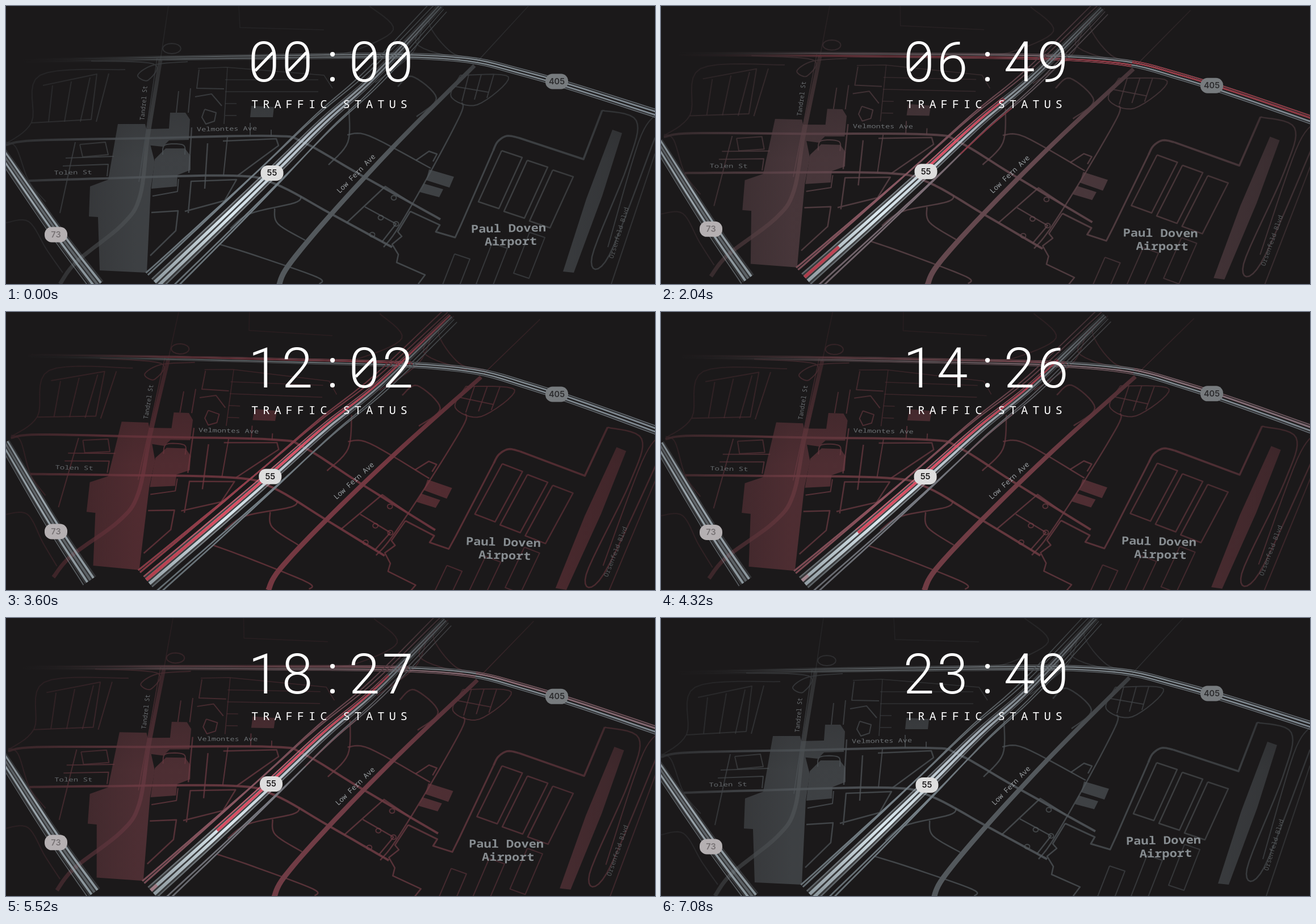
Animation, 1143 px wide and 490 px high, one loop 7200 ms. Source, as an HTML page with a canvas:

```html
<!DOCTYPE html>
<html lang="en">
<head>
<meta charset="utf-8">
<title>Traffic status</title>
<style>
  html, body { margin: 0; width: 100%; height: 100%; overflow: hidden; background: #1b191a; }
  canvas, svg { position: absolute; left: 0; top: 0; width: 1143px; height: 490px; display: block; }
  #clock text { font: 300 98.5px Roboto, "Open Sans", sans-serif; text-anchor: middle; fill: #fff; }
  #clock line { stroke: #fff; stroke-width: 5; }
  #title { font: 400 20.5px "Noto Sans Mono", "DejaVu Sans Mono", monospace; letter-spacing: 7.9px; fill: #fff; }
</style>
</head>
<body>
<canvas id="map" width="1143" height="490"></canvas>
<svg viewBox="0 0 1143 490">
  <g id="clock"></g>
  <text id="title" x="432" y="179.5">TRAFFIC STATUS</text>
</svg>
<script>
const W = 1143, H = 490, LOOP = 7200, STEP = 120;
const ctx = document.getElementById('map').getContext('2d');
let turn = 0;

const lerp = (a, b, k) => a + (b - a) * k;
const mix = (a, b, k) => `rgb(${a.map((v, i) => Math.round(lerp(v, b[i], k))).join()})`;
const ease = (a, b, x) => {
  const k = Math.min(1, Math.max(0, (x - a) / (b - a)));
  return k * k * (3 - 2 * k);
};
// Rises from a to b, stays up, falls from c to d.
const span = (x, a, b, c, d) => ease(a, b, x) * (1 - ease(c, d, x));

// Turn a point about the stage centre on the tilted ground plane.
const CX = 571.5, CY = 245, TILT = 0.745, DEPTH = 4.4e-4;
function warp([x, y]) {
  const X = x - CX, Y = CY - y;
  const v = Y / (TILT - DEPTH * Y), u = X * (1 + DEPTH * v);
  const c = Math.cos(turn), s = Math.sin(turn);
  const u2 = u * c + v * s, v2 = v * c - u * s, z = 1 + DEPTH * v2;
  return [CX + u2 / z, CY - TILT * v2 / z];
}

function parse(text) {
  return text.split(' ').map(p => p.split(',').map(Number));
}

// Catmull-Rom curve through the points.
function smooth(p) {
  const out = [];
  for (let i = 0; i < p.length - 1; i++) {
    const a = p[i - 1] || p[i], b = p[i], c = p[i + 1], d = p[i + 2] || c;
    for (let t = 0; t < 1; t += 0.125) {
      out.push([0, 1].map(j => b[j] + 0.5 * t * (c[j] - a[j] +
        t * (2 * a[j] - 5 * b[j] + 4 * c[j] - d[j] + t * (3 * (b[j] - c[j]) + d[j] - a[j])))));
    }
  }
  return [...out, p[p.length - 1]];
}

function trace(pts, close) {
  ctx.beginPath();
  pts.forEach(p => ctx.lineTo(...warp(p)));
  if (close) ctx.closePath();
}

const areas = [], streets = [];
const area = text => areas.push(parse(text));
const street = (w, a, pts) => streets.push({ w, a, pts });
const line = (w, text, a = 0.85) => street(w, a, parse(text));
const curve = (w, text, a = 0.85) => street(w, a, smooth(parse(text)));
function ring(x, y, rx, ry, w = 2) {
  street(w, 0.8, Array.from({ length: 17 }, (_, i) =>
    [x + rx * Math.cos(i * Math.PI / 8), y + ry * Math.sin(i * Math.PI / 8)]));
}
// Slanted box from a corner and two side vectors.
function box(x, y, ax, ay, bx, by, w = 2.5, a = 0.75) {
  street(w, a, [[x, y], [x + ax, y + ay], [x + ax + bx, y + ay + by], [x + bx, y + by], [x, y]]);
}

// Built-up areas and runway
area('197,208 245,208 262,275 255,322 248,470 165,466 162,372 146,371 148,318 180,306');
area('245,217 287,216 289,188 316,188 324,200 322,236 287,237 276,248 248,245');
area('262,270 281,251 315,251 325,264 325,289 302,298 301,318 256,322');
area('432,176 472,178 470,196 430,196');
area('745,288 789,301 781,320 740,307');
area('736,313 770,323 763,337 729,328');
area('1068,218 1085,224 1050,335 1000,470 981,468 1022,340');

// Main streets
curve(4, '0,245 50,237 250,233 470,229 525,241 625,298 765,376', 1);
curve(4, '40,308 170,304 400,299 475,314 572,366 680,425', 1);
curve(7, '272,95 250,230 236,335 205,385 125,450 95,490', 0.75);
line(1.5, '286,0 272,95', 0.6);
line(1.5, '266,92 234,310');

// West side
curve(2, '0,243 45,205 60,122 210,112', 0.6);
curve(2, '0,240 18,250 40,308 70,345', 0.6);
curve(2, '0,382 40,380 72,430 100,470', 0.5);
line(2, '45,206 150,200 160,120 65,140', 0.7);
for (let i = 0; i < 4; i++) line(2, `${82 + i * 33},${140 - i * 7} ${75 + i * 28},204`, 0.7);
box(130, 244, 45, -4, 5, 22, 2);
line(2, '105,268 190,265');
line(2, '100,282 180,279 178,300');
line(2, '122,240 95,365');

// Around the mall
line(2, '325,145 321,188');
line(2, '304,150 300,188');
curve(2, '276,262 280,245 312,245 315,262');
for (const x of [352, 324]) line(2.5, `${x + 3},${x - 110} ${x - 2},${x - 30}`);
line(2.5, '382,238 476,234 480,246 408,299');
line(2, '390,231 383,299');
line(2, '430,206 430,229');
line(2, '467,218 467,230');
line(2.5, '315,362 385,343 406,306 326,309 321,365');
line(2.5, '256,364 303,361 299,396 254,440');
line(2, '258,335 302,327 304,305');

// North blocks
line(1.5, '338,110 388,108 560,122 575,145', 0.7);
line(1.5, '390,108 384,208', 0.7);
for (let y = 130; y < 200; y += 21) line(1.5, `386,${y} ${y < 160 ? 550 : 406},${y}`, 0.6);
line(2, '340,112 336,145 384,146');
line(2, '333,160 362,155 380,176');
line(2, '350,182 370,188 367,203 352,208 345,196 350,182');
ring(292, 75, 16, 9);
curve(2, '150,97 260,102 250,131 232,122 260,104 320,98');
line(1.5, '410,0 412,38 560,42', 0.5);
curve(2, '640,0 682,42 610,80 560,86', 0.7);
curve(2, '770,0 745,30 785,82 830,92');
curve(2, '755,8 722,65 800,94');
curve(2, '735,28 715,84 650,135');
line(1.5, '920,0 830,98');

// East of the freeway
curve(2.5, '690,142 715,124 758,162 723,195');
curve(2.5, '604,180 602,240 568,280');
curve(2.5, '601,227 640,229 748,286');
line(2.5, '722,272 745,256 759,261 752,274');
curve(2.5, '803,170 800,192 745,297 690,392 665,425');
curve(2, '800,122 885,125 830,174 784,160 800,122');
for (let i = 0; i < 3; i++) line(2, `${815 + i * 22},121 ${803 + i * 22},${168 - i * 3}`);
line(2, '792,142 850,152');
line(2.5, '600,382 668,318 712,346');
line(2.5, '632,354 687,384 662,416');
for (const p of ['683,338', '660,373', '687,384', '645,403']) ring(...p.split(',').map(Number), 4.5, 4);
curve(2.5, '473,357 479,384 527,413');
curve(2.5, '395,392 430,366 508,347 520,335');
curve(2.5, '376,420 440,440 548,478 552,490');

// Airport grounds
line(3, '712,362 764,386 757,398 791,408 802,384 858,255');
curve(3.5, '858,255 866,239 882,229 902,232');
line(3.5, '902,232 1017,270 1050,184');
line(2.5, '712,362 690,398 697,406 680,420 691,438 688,452 738,474 726,490');
for (let i = 0; i < 3; i++) box(873 + i * 45, 255 + i * 17, 36, 12, -41, 90);
for (let i = 0; i < 3; i++) box(790 + i * 66, 437 - i * 19, 27, 9, -28, 72, 2, 0.6);
curve(2.5, '1050,184 1110,202 1095,280 1032,442 1062,440 1143,232');
curve(2, '1143,192 1114,240 1060,425');
line(2, '1143,260 1066,490', 0.7);

// Freeways
const fwy55 = smooth(parse('765,0 650,123 560,204 468,295 370,390 265,490'));
const fwy405 = smooth(parse('20,97 420,90 760,90 920,120 1150,191'));
const fwy73 = smooth(parse('-10,254 88,395 162,492'));
const avenue = smooth(parse('480,495 497,458 570,370 690,240 825,105'));

// Tapered band beside a path: offset and width at both ends, over a range.
function ribbon(pts, d0, w0, d1, w1, from = 0, to = 1) {
  const last = pts.length - 1, left = [], right = [];
  const n = Math.max(4, Math.ceil((to - from) * last));
  for (let j = 0; j <= n; j++) {
    const f = lerp(from, to, j / n), s = f * last;
    const i = Math.min(last - 1, Math.floor(s));
    const [ax, ay] = pts[i], [bx, by] = pts[i + 1];
    const len = Math.hypot(bx - ax, by - ay);
    const nx = (ay - by) / len, ny = (bx - ax) / len;
    const x = lerp(ax, bx, s - i), y = lerp(ay, by, s - i);
    const d = lerp(d0, d1, f), h = lerp(w0, w1, f) / 2;
    left.push([x + nx * (d + h), y + ny * (d + h)]);
    right.unshift([x + nx * (d - h), y + ny * (d - h)]);
  }
  trace(left.concat(right), true);
  ctx.fill();
}

function band(fill, alpha, ...shape) {
  if (alpha <= 0) return;
  ctx.globalAlpha = alpha;
  ctx.fillStyle = fill;
  ribbon(...shape);
  ctx.globalAlpha = 1;
}

// Evenly spaced colour stops.
function shade(x, y, ...colors) {
  const g = ctx.createLinearGradient(0, 0, x, y);
  colors.forEach((c, i) => g.addColorStop(i / (colors.length - 1), c));
  return g;
}
const veil = a => `rgba(27,25,26,${a})`;
const pale55 = shade(0, H, '#424649', '#757c82', '#b4bfc8', '#dce9ef', '#8c979d');
const red55 = shade(0, H, '#642d35', '#a33c4b', '#d95267', '#d84d61', '#a83c49');
const side55 = shade(0, H, '#35383a', '#5a6064', '#758087', '#626b70');
const sideRed = shade(0, H, '#40252a', '#73333d', '#9a3a47', '#81343e');
const pale405 = shade(W, 0, veil(0), '#53585b', '#6b7175', '#7d868c', '#79828a');
const red405 = shade(W, 0, veil(0), '#602a31', '#74313a', '#9c3945', '#8a3640');
const pale73 = shade(0, H, '#4d5357', '#6d767b', '#9aa5ac', '#8a959b');
const skyVeil = shade(0, 270, veil(0.72), veil(0.46), veil(0.2), veil(0));
const sideVeil = shade(W, 0, veil(0.6), veil(0.05), veil(0), veil(0), veil(0.08), veil(0.4));

function label(text, x, y, angle, size, color, { squash = 1, weight = 500, blur = 0 } = {}) {
  const a = angle * Math.PI / 180;
  const p = warp([x, y]), q = warp([x + 20 * Math.cos(a), y + 20 * Math.sin(a)]);
  ctx.save();
  ctx.translate(...p);
  ctx.rotate(Math.atan2(q[1] - p[1], q[0] - p[0]));
  ctx.scale(1, squash);
  ctx.font = `${weight} ${size}px "Noto Sans Mono", "DejaVu Sans Mono", monospace`;
  if (blur) ctx.filter = `blur(${blur}px)`;
  ctx.fillStyle = color;
  ctx.fillText(text, 0, 0);
  ctx.restore();
}

function shield(text, x, y, fill, ink) {
  ctx.fillStyle = fill;
  ctx.beginPath();
  ctx.roundRect(x - 20, y - 13.5, 40, 27, 12.5);
  ctx.fill();
  ctx.font = '600 14.5px Inter, Roboto, sans-serif';
  ctx.fillStyle = ink;
  ctx.fillText(text, x, y + 0.5);
}

function drawMap(hour, swing) {
  const midday = span(hour, 5, 10, 13.5, 16), evening = span(hour, 17, 19.5, 21, 23.3);
  const morning = span(hour, 4, 6.5, 7.5, 10.5), afternoon = span(hour, 13.5, 16, 17, 19.5);
  const rush = morning + afternoon, jam = midday + evening;
  const heat = span(hour, 4, 9.6, 20.8, 23.4) * (1 - 0.35 * afternoon);

  ctx.fillStyle = '#1b191a';
  ctx.fillRect(0, 0, W, H);
  ctx.fillStyle = mix([63, 66, 69], [82, 44, 49], heat);
  areas.forEach(p => { trace(p, true); ctx.fill(); });

  const tone = mix([83, 88, 92], [116, 56, 65], heat);
  ctx.strokeStyle = tone;
  ctx.lineJoin = 'round';
  for (const s of streets) {
    ctx.globalAlpha = s.a * 0.85;
    ctx.lineWidth = s.w;
    trace(s.pts);
    ctx.stroke();
  }
  band(tone, 1, avenue, 0, 10, 0, 7);

  ctx.fillStyle = skyVeil;
  ctx.fillRect(0, 0, W, 270);
  ctx.fillStyle = sideVeil;
  ctx.fillRect(0, 0, W, H);

  // Route 405: each direction jams at its own hours
  for (const d of [-6, -2.5, 2.5, 6]) {
    const w = Math.abs(d) > 3 ? 1.5 : 2.6;
    const lane = [fwy405, d * 0.5, w * 0.6, d * 1.15, w * 1.25];
    band(pale405, w > 2 ? 1 : 0.7, ...lane);
    if (d < 0) {
      band(red405, rush, ...lane, 0.58, 1);
      band(red405, jam, ...lane, 0, 0.45);
    } else band(red405, rush, ...lane, 0, 0.58);
  }

  // Route 73
  band(pale73, 0.22, fwy73, 0, 18, 0, 24);
  for (const d of [-5, 0, 5]) band(pale73, d ? 1 : 0.45, fwy73, d, 3, d * 1.3, 4);
  band(pale73, 0.5, fwy73, 10, 1.5, 15, 2);

  // Route 55 with its frontage roads
  for (const [d0, d1] of [[17, 22], [9, 27], [-15, -23], [-8, -30]]) {
    const road = [fwy55, d0, 1.6, d1, 3];
    band(side55, 1, ...road);
    band(sideRed, d0 > 0 ? Math.max(jam, morning * 0.6) : rush * 0.25, ...road);
  }
  band(sideRed, rush, fwy55, -15, 2, -23, 3, 0.3, 0.5);
  band(pale55, 0.22, fwy55, 0, 8, 0, 24);
  for (const d of [-1, 1]) {
    const inner = [fwy55, 2 * d, 2.2, 4.5 * d, 6], outer = [fwy55, 5 * d, 1, 12 * d, 2.5];
    band(pale55, 1, ...inner);
    band(pale55, 0.5, ...outer);
    if (d < 0) continue;
    // The queue grows outward from the interchange
    const queue = [lerp(0.43, 0, jam), lerp(0.43, 1, jam)];
    if (jam > 0) band(red55, 1, ...inner, ...queue);
    if (jam > 0) band(red55, 0.7, ...outer, ...queue);
    band(red55, rush, ...inner, lerp(0.97, 0.88, morning), 1);
  }

  ctx.textAlign = 'center';
  ctx.textBaseline = 'middle';
  label('Velmontes Ave', 389, 217, -1, 13.6, '#6d7174', { squash: 0.75 });
  label('Tolen St', 118, 294, -1, 14, '#64686b', { squash: 0.72, blur: 0.4 });
  label('Tandrel St', 243, 171, -85, 10.2, '#6a6e71', { squash: 1.1 });
  label('Low Fern Ave', 617, 296, -45.5, 12.6, '#989da0');
  label('Orsenfeld Blvd', 1080, 400, -73, 11.2, '#55595b', { blur: 0.7 });
  const big = { squash: 0.88, weight: 600, blur: 0.6 };
  label('Paul Doven', 885, 393, -1, 22, '#878d91', big);
  label('Airport', 889, 416, -1, 22, '#878d91', big);

  shield('405', 970, 133 + 12 * swing, '#777b7e', '#2b2b2d');
  shield('73', 88, 403 - 16 * swing, '#b5b0b2', '#777274');
  shield('55', ...warp([468.5, 294.5]), '#dedede', '#1b191a');
}

// Clock cells, each with a slash for zero
function addMark(tag, attrs) {
  const el = document.createElementNS('http://www.w3.org/2000/svg', tag);
  for (const name in attrs) el.setAttribute(name, attrs[name]);
  return document.getElementById('clock').appendChild(el);
}
const cells = [454, 513, 575, 631, 690].map(x => ({
  digit: addMark('text', { x, y: 133 }),
  slash: addMark('line', { x1: x - 15, y1: 114, x2: x + 16, y2: 82 })
}));

function drawClock(minutes) {
  const two = n => String(n).padStart(2, '0');
  const text = `${two(Math.floor(minutes / 60))}:${two(minutes % 60)}`;
  cells.forEach(({ digit, slash }, i) => {
    digit.textContent = text[i];
    slash.style.display = text[i] === '0' ? '' : 'none';
  });
}

let shown = -1;
function tick() {
  const step = Math.floor(performance.now() % LOOP / STEP);
  if (step !== shown) {
    shown = step;
    const minutes = Math.floor(step * 24.08);
    const swing = (1 - Math.cos(2 * Math.PI * step * STEP / LOOP)) / 2;
    turn = 0.055 * swing;
    drawMap(minutes / 60, swing);
    drawClock(minutes);
  }
  requestAnimationFrame(tick);
}
tick();
</script>
</body>
</html>
```
